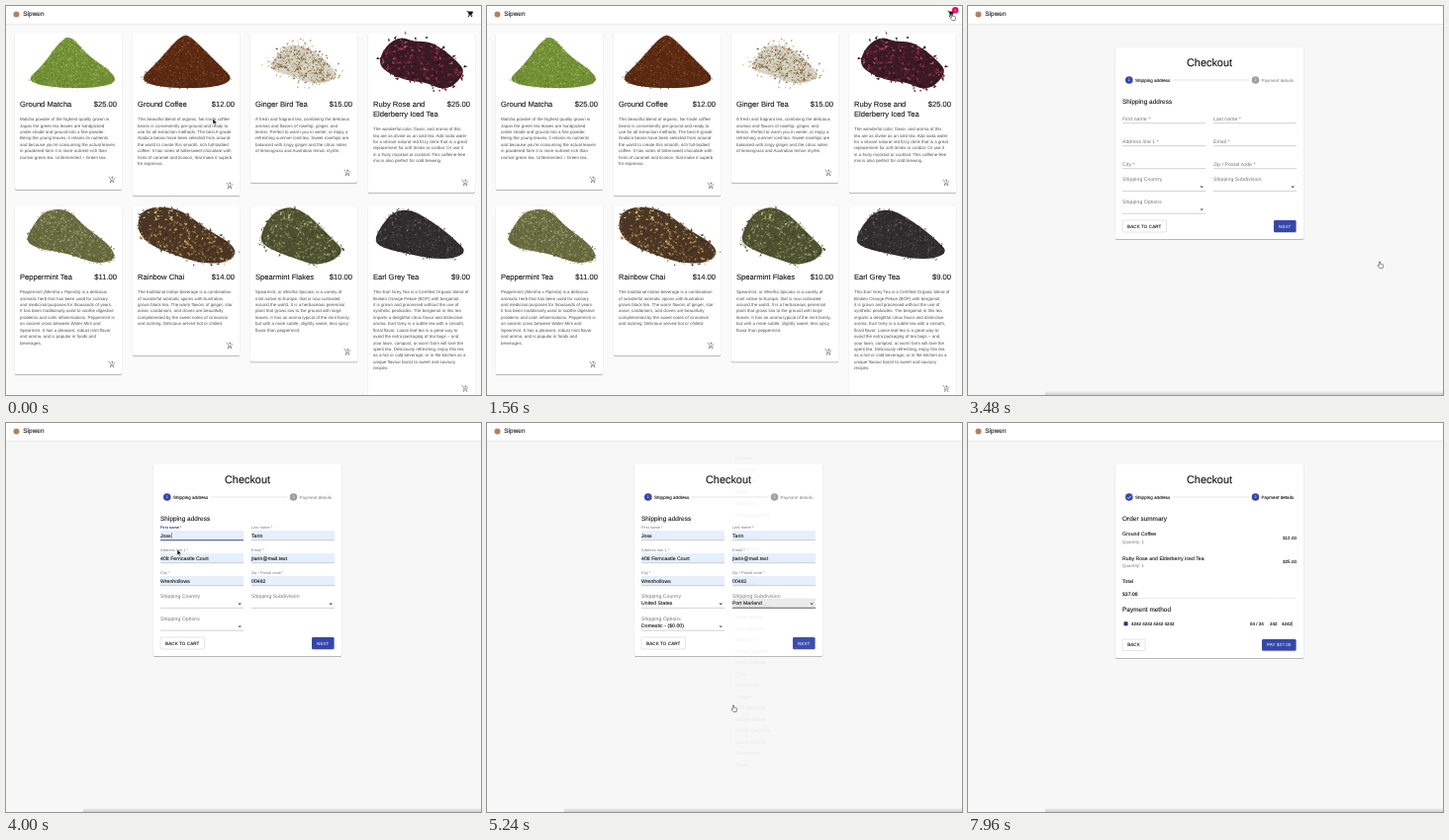
An HTML page that plays this animation: 480x394 px, repeating every 8000 ms.

```html
<!DOCTYPE html>
<html lang="en">
<head>
<meta charset="utf-8">
<title>Tea shop checkout</title>
<style>
html, body { margin: 0; width: 100%; height: 100%; overflow: hidden; background: #fafafa; }
svg { display: block; width: 100vw; height: 100vh; }
text { font-family: "Liberation Sans", Arial, sans-serif; fill: #161616; stroke: #161616; stroke-width: .1; text-rendering: geometricPrecision; white-space: pre; }
.h { letter-spacing: .0075em; }
.body { letter-spacing: .0107em; }
.cap { letter-spacing: .02em; }
.btn { letter-spacing: .0286em; }
.grey { fill: #757575; stroke: none; }
.desc { fill: #505050; stroke: none; }
.white { fill: #fff; stroke: none; }
.bold { font-weight: 700; stroke: none; }
.mid { text-anchor: middle; }
.end { text-anchor: end; }
.paper { fill: #fff; }
.menu { fill: #fff; filter: drop-shadow(0 1.5px 2px rgba(0,0,0,.3)); }
</style>
</head>
<body>
<svg id="stage" viewBox="0 0 480 394" preserveAspectRatio="none"></svg>
<script>
const LOOP = 8000;
const BLUE = '#3546ab', PINK = '#f50057', LINE = '#8d8d8d';
// Scene boundaries and interactions, in ms
const AT = { cart: 1640, plus: 2200, minus: 2760, remove: 3000, checkout: 3440, fill: 3840, country: 4680, region: 5120, pay: 5840, type: 6240 };

const text = (x, y, size, str, cls = 'body', more = '') =>
  `<text x="${x}" y="${y}" font-size="${size}" class="${cls}" ${more}>${str}</text>`;
const rect = (x, y, w, h, fill, more = '') =>
  `<rect x="${x}" y="${y}" width="${w}" height="${h}" fill="${fill}" ${more}/>`;
const paper = (x, y, w, h) => rect(x - .5, y, w + 1, h + .7, '#000', 'rx="1.5" opacity=".06"') +
  rect(x, y + 2, w, h - 1.2, '#000', 'rx="1.3" opacity=".3"') + rect(x, y, w, h, '#fff', 'rx="1.3"');
const line = (x1, x2, y, color = LINE, w = .4, more = '') =>
  `<path d="M${x1} ${y}H${x2}" stroke="${color}" stroke-width="${w}" ${more}/>`;
const during = (from, to, content) => `<g data-on="${from} ${to}">${content}</g>`;
const fading = (from, to, content) => `<g data-fade="${from} ${to}">${content}</g>`;
const lines = (x, y, size, step, str, cls) =>
  str.split('|').map((s, i) => text(x, y + i * step, size, s, cls)).join('');
const button = (x, y, w, h, label, fill) => fill
  ? rect(x, y + 1, w, h - .3, '#000', 'rx="1.3" opacity=".25"') + rect(x, y, w, h, fill, 'rx="1.3"') + text(x + w / 2, y + h / 2 + 1.6, 4.48, label, 'btn mid white')
  : rect(x, y, w, h, '#fff', 'rx="1.3" stroke="#bbb" stroke-width=".4"') + text(x + w / 2, y + h / 2 + 1.6, 4.48, label, 'btn mid');

function random(seed) {
  return () => {
    seed = (seed + 0x6D2B79F5) | 0;
    let t = Math.imul(seed ^ seed >>> 15, 1 | seed);
    t = t + Math.imul(t ^ t >>> 7, 61 | t) ^ t;
    return ((t ^ t >>> 14) >>> 0) / 4294967296;
  };
}

function inside(points, x, y) {
  let hit = false;
  points.forEach(([x1, y1], i) => {
    const [x2, y2] = points.at(i - 1);
    if (y1 > y !== y2 > y && x < (x2 - x1) * (y - y1) / (y2 - y1) + x1) hit = !hit;
  });
  return hit;
}

// A heap of grains within an outline; colours run from light to dark.
function heap(id, { outline, grain, count, loose, colors }) {
  const rnd = random(id * 97 + 5), f = n => n.toFixed(1);
  const points = outline.split(' ').map(p => p.split(',').map(Number));
  const xs = points.map(p => p[0]), ys = points.map(p => p[1]);
  const left = Math.min(...xs), top = Math.min(...ys);
  const width = Math.max(...xs) - left, height = Math.max(...ys) - top;
  const middle = ([ax, ay], [bx, by]) => `${(ax + bx) / 2} ${(ay + by) / 2}`;
  const body = 'M' + middle(points.at(-1), points[0]) +
    points.map((p, i) => `Q${p.join(' ')} ${middle(p, points[(i + 1) % points.length])}`).join('') + 'Z';
  const paths = colors.map(() => '');
  for (let i = 0; i < count;) {
    let x = left + width * rnd(), y = top + height * rnd();
    if (!inside(points, x, y)) continue;
    i++;
    const depth = (y - top) / height;
    x += (rnd() + rnd() - 1) * loose;
    y += (rnd() + rnd() - 1) * loose;
    const tone = Math.floor((rnd() * .8 + depth * .2) * colors.length);
    const a = rnd() * 6.28, r = grain * (.5 + rnd() * .7), dx = Math.cos(a) * r, dy = Math.sin(a) * r;
    paths[tone] += `M${f(x - dx)} ${f(y - dy)}l${f(dx * 2)} ${f(dy * 2)}l${f(-dy - dx * .6)} ${f(dx - dy * .6)}z`;
  }
  return `<g id="heap${id}"><path d="${body}" fill="${colors.at(-2)}" opacity="${loose > 6 ? .25 : 1}"/>` +
    paths.map((d, i) => `<path d="${d}" fill="${colors[i]}"/>`).reverse().join('') + '</g>';
}
const pile = (grain, count, loose, colors, outline) => ({ grain, count, loose, colors: colors.split(' '), outline });

const products = [
  { name: 'Ground Matcha', price: 25, h: 158, pile: pile(.9, 1100, 1.5, '#b4cb78 #9dba59 #86a443 #6f8d33 #567423',
      '13,46 24,36 34,24 44,10 53,3 60,6 70,18 82,28 94,36 103,46 96,52 75,55 48,55 24,52'),
    desc: 'Matcha powder of the highest quality grown in|Japan the green tea leaves are handpicked|under shade and ground into a fine powder.|Being the young leaves, it retains its nutrients|and because you’re consuming the actual leaves|in powdered form it is more nutrient-rich than|normal green tea. Unfermented = Green tea.' },
  { name: 'Ground Coffee', price: 12, h: 164, pile: pile(.9, 1100, 1.5, '#a9683c #8a4c27 #70381a #582811 #3f1b0b',
      '8,45 22,32 36,16 46,5 54,1 62,6 76,20 90,34 101,45 92,52 72,55 40,55 18,52'),
    desc: 'This beautiful blend of organic, fair-trade coffee|beans is conveniently pre-ground and ready to|use for all extraction methods. The best A-grade|Arabica beans have been selected from around|the world to create this smooth, rich full-bodied|coffee. It has notes of bittersweet chocolate with|hints of caramel and licorice, that make it superb|for espresso.' },
  { name: 'Ginger Bird Tea', price: 15, h: 151, pile: pile(1.4, 520, 9, '#efe6c8 #d6c99a #b3a76c #8f8a4e #9c4a32 #5d5230 #7d7344',
      '20,31 28,20 38,11 50,12 66,18 80,32 90,44 72,51 55,49 40,42 24,38'),
    desc: 'A fresh and fragrant tea, combining the delicious|aromas and flavors of rosehip, ginger, and|lemon. Perfect to warm you in winter, or enjoy a|refreshing summer iced tea. Sweet rosehips are|balanced with zingy ginger and the citrus notes|of lemongrass and Australian lemon myrtle.' },
  { name: 'Ruby Rose and|Elderberry Iced Tea', price: 25, h: 161, pile: pile(2.2, 330, 6, '#a8506a #8f2c46 #5e1f34 #43192a #2e1420 #3a1a24 #241018',
      '10,29 18,12 32,3 46,8 62,8 76,16 90,28 98,38 88,52 74,57 58,49 40,48 18,39'),
    desc: 'The wonderful color, flavor, and aroma of this|tea are as divine as an iced tea. Add soda water|for a vibrant natural red fizzy drink that is a great|replacement for soft drinks or cordial. Or use it|in a fruity mocktail or cocktail. This caffeine-free|mix is also perfect for cold brewing.' },
  { name: 'Peppermint Tea', price: 11, h: 170, pile: pile(1.2, 800, 3, '#b5b48e #97976c #7d7e50 #66693d #4b4e2c',
      '10,35 18,20 28,6 44,2 57,6 70,20 84,30 98,42 102,54 84,58 68,53 50,47 24,43'),
    desc: 'Peppermint <tspan font-style="italic">(Mentha x Piperita)</tspan> is a delicious|aromatic herb that has been used for culinary|and medicinal purposes for thousands of years.|It has been traditionally used to soothe digestive|problems and calm inflammations. Peppermint is|an ancient cross between Water Mint and|Spearmint. It has a pleasant, robust mint flavor|and aroma, and is popular in foods and|beverages.' },
  { name: 'Rainbow Chai', price: 14, h: 151, pile: pile(1.7, 520, 4, '#e2cc94 #c2964e #85643a #5a4630 #4a4a2c #4a3524 #33261c',
      '4,22 8,6 22,0 44,2 58,10 76,24 98,36 106,48 92,58 66,57 36,47 14,37'),
    desc: 'The traditional Indian beverage is a combination|of wonderful aromatic spices with Australian|grown black tea. The warm flavors of ginger, star|anise, cardamom, and cloves are beautifully|complimented by the sweet notes of cinnamon|and nutmeg. Delicious served hot or chilled.' },
  { name: 'Spearmint Flakes', price: 10, h: 157.4, pile: pile(1.7, 520, 4, '#b9b583 #92915c #74774a #5d6238 #4c5030 #3a3f24',
      '8,36 16,16 26,4 42,0 58,8 70,20 84,34 94,44 86,54 66,60 46,53 26,46'),
    desc: 'Spearmint, or <tspan font-style="italic">Mentha Spicata,</tspan> is a variety of|mint native to Europe, that is now cultivated|around the world. It is a herbaceous perennial|plant that grows low to the ground with large|leaves. It has an aroma typical of the mint family,|but with a more subtle, slightly sweet, less spicy|flavor than peppermint.' },
  { name: 'Earl Grey Tea', price: 9, h: 194.5, pile: pile(1.2, 700, 3, '#736b6c #524b4c #3d3739 #302b2d #211d1f',
      '5,36 14,18 26,5 42,3 56,10 74,22 88,34 100,46 86,53 64,53 40,48 18,43'),
    desc: 'This Earl Grey Tea is a Certified Organic blend of|Broken Orange Pekoe (BOP) with bergamot,|it is grown and processed without the use of|synthetic pesticides. The bergamot in this tea|imparts a delightful citrus flavor and distinctive|aroma. Earl Grey is a subtle tea with a smooth,|floral flavor. Loose leaf tea is a great way to|avoid the extra packaging of tea bags – and|your lawn, compost, or worm farm will love the|spent tea. Deliciously refreshing, enjoy this tea|as a hot or cold beverage; or in the kitchen as a|unique flavour boost to sweet and savoury|recipes.' }
];
const money = n => `$${n.toFixed(2)}`;

const trolley = (x, y, color, filled) => `<g transform="translate(${x} ${y}) scale(.32)" stroke="${color}" fill="none" stroke-width="2">
  <path d="M-11-9h3l5 10h8l4-7M-3 1l-2 4h12"/><g fill="${color}" stroke="none"><circle cx="-5" cy="8" r="2"/><circle cx="5" cy="8" r="2"/>
  ${filled ? '<path d="M-7-8H9L5 2h-8z"/>' : '<path d="M0-11h2v3h3v2H2v3H0v-3h-3v-2h3z"/>'}</g></g>`;

function productCard(p, i) {
  const x = 9 + 119 * (i % 4), y = i < 4 ? 28 : 203, extra = p.name.includes('|') ? 10 : 0;
  return paper(x, y, 108, p.h) + `<use href="#heap${i}" x="${x}" y="${y}"/>` +
    lines(x + 5, y + 74, 7.6, 10, p.name, '') + text(x + 103, y + 74, 7.6, money(p.price), 'end') +
    lines(x + 5, y + 88.2 + extra, 4.45, 6.42, p.desc, 'desc') + trolley(x + 98, y + p.h - 10, '#757575');
}

function cartCard(slot, id, name, numbers) {
  const x = 48 + 133 * slot, rows = name.split('|').length - 1, y = 178 + rows * 13.3;
  return paper(x, 64, 126, 122 + rows * 13.3) + `<use href="#heap${id}" transform="translate(${x} 72) scale(1.16)"/>` +
    lines(x + 5, 161.4, 10.9, 13.4, name, '') + text(x + 12.5, y + 1.5, 4.48, '-', 'mid') +
    text(x + 39, y + 1.5, 4.48, '+', 'mid') + numbers(x, y) + button(x + 52, y - 6, 30, 12, 'REMOVE', PINK);
}
const amounts = (qty, price) => (x, y) =>
  text(x + 26, y + 1.6, 4.6, qty, 'mid') + text(x + 120.5, 158.6, 7.5, money(price), 'end');
const gingerAmounts = (x, y) =>
  during(AT.cart, AT.plus, amounts(1, 15)(x, y)) +
  during(AT.plus, AT.minus, amounts(2, 30)(x, y)) +
  during(AT.minus, AT.remove, amounts(1, 15)(x, y));

function cartPage() {
  const ruby = slot => cartCard(slot, 3, 'Ruby Rose and|Elderberry Iced|Tea', amounts(1, 25));
  const subtotal = n => text(48, 262.3, 10.9, `Subtotal: ${money(n)}`, '');
  return rect(0, 0, 480, 394, '#fdfdfd') + text(48, 54.2, 12, 'Your Shopping Cart', '') +
    cartCard(0, 1, 'Ground Coffee', amounts(1, 12)) +
    during(AT.cart, AT.remove, cartCard(1, 2, 'Ginger Bird Tea', gingerAmounts) + ruby(2)) +
    during(2080, AT.minus, rect(213, 172, 14, 12, '#000', 'opacity=".035" rx="1"')) +
    during(AT.remove, AT.checkout, ruby(1)) +
    during(AT.cart, AT.plus, subtotal(52)) + during(AT.plus, AT.minus, subtotal(67)) +
    during(AT.minus, AT.remove, subtotal(52)) + during(AT.remove, AT.checkout, subtotal(37)) +
    button(338, 252, 48, 13.5, 'EMPTY CART', PINK) + button(392, 252, 48, 13.5, 'CHECKOUT', BLUE);
}

const stepDot = (x, label, color) => `<circle cx="${x}" cy="75" r="3.8" fill="${color}"/>` + text(x, 76.4, 3.8, label, 'mid white');
const tick = `<circle cx="162.8" cy="75" r="3.8" fill="${BLUE}"/><path d="M160.9 75.1l1.4 1.4 2.6-2.8" fill="none" stroke="#fff" stroke-width=".8"/>`;

function field(x, y, label, value, focused) {
  const blue = focused ? during(AT.fill, 4300, line(x, x + 84, y + 4.7, BLUE, .9) + text(x, y - 6.8, 3.85, label, 'cap', `style="fill:${BLUE};stroke:none"`) + rect(x + 11.2, y - 3, .4, 6, '#222')) : '';
  return during(AT.checkout, AT.fill, text(x, y + 1.8, 5.12, label, 'body grey')) +
    during(AT.fill, AT.pay, rect(x, y - 5, 84, 9.7, '#e6effc') + text(x, y - 6.8, 3.85, label, 'cap grey') + text(x, y + 1.8, 5.12, value)) +
    line(x, x + 84, y + 4.7) + blue;
}
function select(x, y, label, value, from) {
  return text(x, y - 5.8, 5.12, label, 'body grey') + during(from, AT.pay, text(x, y + 1.7, 5.12, value)) +
    `<path d="M${x + 78.4} ${y}h3.6l-1.8 1.8z" fill="#555"/>` + line(x, x + 84, y + 4.8);
}
function menu(x, y, w, names, from, to) {
  return fading(from, to, rect(x, y, w, names.length * 11.5 + 5, '#fff', 'rx="1.3" class="menu"') +
    names.map((n, i) => text(x + 5, y + 10 + i * 11.5, 5.12, n)).join(''));
}
const countries = 'Sudan,Suriname,Sweden,Switzerland,Tanzania,Thailand,Togo,Tonga,Tunisia,Turkey,Uganda,Ukraine,United Kingdom,United States,Uruguay,Vanuatu,Vietnam,Yemen,Zambia,Zimbabwe'.split(',');
const regions = 'Kansas,Kentucky,Louisiana,Maine,Maryland,Massachusetts,Michigan,Minnesota,Mississippi,Missouri,Montana,Nebraska,Nevada,New Hampshire,New Jersey,New Mexico,New York,North Carolina,North Dakota,Ohio,Oklahoma,Oregon,Port Marland,Rhode Island,South Carolina,South Dakota,Tennessee,Texas'.split(',');

const shipping = () => paper(149, 42, 190, 194) + stepDot(162.8, 1, BLUE) + stepDot(290.5, 2, '#9e9e9e') +
  text(296.5, 76.6, 4.48, 'Payment details', 'body grey') + text(156, 98.7, 6.4, 'Shipping address', 'h') +
  field(156, 114, 'First name *', 'Joss', true) + field(248, 114, 'Last name *', 'Tarin') +
  field(156, 137, 'Address line 1 *', '408 Ferncastle Court') + field(248, 137, 'Email *', 'jtarin@mail.test') +
  field(156, 160, 'City *', 'Wrenhollows') + field(248, 160, 'Zip / Postal code *', '00482') +
  during(AT.region, AT.pay, rect(248, 177.6, 84, 9.6, '#e9e9e9')) +
  select(156, 182.6, 'Shipping Country', 'United States', AT.country) +
  select(248, 182.6, 'Shipping Subdivision', 'Port Marland', AT.region) +
  during(AT.region, AT.pay, line(248, 332, 187.3, '#333', .7)) +
  select(156, 205.4, 'Shipping Options', 'Domestic - ($0.00)', AT.country + 160) +
  button(156, 217, 44.5, 12, 'BACK TO CART') + button(309, 217, 22.5, 12, 'NEXT', BLUE);

const orderLine = (y, name, price) => text(156, y, 5.12, name) + text(156, y + 7.2, 4.48, 'Quantity: 1', 'body grey') +
  text(332, y + 3.3, 4.48, money(price), 'body end');
const payment = () => paper(149, 42, 190, 196) + tick + stepDot(290.5, 2, BLUE) +
  text(296.5, 76.6, 4.48, 'Payment details') + text(156, 98.7, 6.4, 'Order summary', 'h') +
  orderLine(114.4, 'Ground Coffee', 12) + orderLine(138.6, 'Ruby Rose and Elderberry Iced Tea', 25) +
  text(156, 161.9, 5.12, 'Total') + text(156, 174.9, 5.12, '$37.00', 'bold') +
  line(156, 332, 177.6, '#aaa', .4, 'stroke-dasharray="1 .6"') + text(156, 191.3, 6.4, 'Payment method', 'h') +
  during(AT.pay, AT.type, rect(156.5, 201.2, 5.6, 4, '#bbb', 'rx=".5"')) +
  during(AT.type, LOOP, rect(157.5, 201.3, 4, 4, '#2b3170')) +
  [165, 285, 305, 317].map((x, i) => text(x, 205, 4.48, '', '', `id="pay${i}"`)).join('') +
  `<rect id="caret" y="200.6" width=".45" height="5.4" fill="#222"/>` +
  button(156, 219, 23, 11.5, 'BACK') + button(297, 219, 34.5, 11.5, 'PAY $37.00', BLUE);

const checkoutPage = () => rect(0, 0, 480, 394, '#f7f7f7') +
  during(AT.checkout, AT.pay, shipping()) + during(AT.pay, LOOP, payment()) +
  text(244, 60.7, 10.9, 'Checkout', 'mid') + text(169, 76.6, 4.48, 'Shipping address') + line(207, 284.5, 75, '#bdbdbd') +
  menu(154, 24, 88, countries, 4320, 4760) + menu(246, 27, 107, regions, 4860, 5248);

const badge = n => `<circle cx="473.2" cy="4.2" r="3.2" fill="${PINK}"/>` + text(473.2, 5.6, 3.8, n, 'mid white');
const header = rect(0, 17.5, 480, 1, '#000', 'opacity=".1"') + rect(0, 0, 480, 17.8, '#fff') +
  '<circle cx="10.5" cy="8.6" r="3" fill="#b5805f"/>' + text(17.3, 10.2, 6.4, 'Sipwen', 'h') +
  during(0, AT.cart, trolley(469, 8, '#111', true)) +
  during(280, 640, badge(1)) + during(640, 1060, badge(2)) + during(1060, AT.cart, badge(3));

const cursor = `<g id="cursor" stroke="#fff" stroke-width=".5" stroke-linejoin="round">
  <path id="arrow" d="M0 0v6l1.4-1.3 1 2.2 1-.4-1-2.1h2z" fill="#111"/>
  <path id="hand" d="M-.6 0q.7-.8 1.2 0v2.2l2.6.6q.7.3.5 1.2l-.6 2.6h-3.2l-2-2.6q.2-.9 1.5 0z" fill="#fff" stroke="#222"/></g>`;

const stage = document.getElementById('stage');
stage.innerHTML = `<defs>
  <linearGradient id="dock" x2="0" y2="1"><stop stop-color="#999" stop-opacity="0"/><stop offset="1" stop-color="#999" stop-opacity=".45"/></linearGradient>
  ${products.map((p, i) => heap(i, p.pile)).join('')}</defs>` +
  during(0, AT.cart, rect(0, 0, 480, 394, '#fafafa') + products.map(productCard).join('')) +
  during(AT.cart, AT.checkout, cartPage()) + during(AT.checkout, LOOP, checkoutPage()) +
  header + during(AT.cart, LOOP, rect(78, 390, 402, 4, 'url(#dock)')) + cursor;

const $ = id => document.getElementById(id);
const ranges = name => [...stage.querySelectorAll(`[data-${name}]`)].map(node => [node, ...node.dataset[name].split(' ').map(Number)]);
const timed = ranges('on'), faded = ranges('fade');

// Pointer stops: time, x, y
const stops = [
  [0, 209, 114], [220, 226, 182], [320, 226, 182], [580, 345, 170], [680, 345, 170], [1000, 464, 180], [1100, 464, 180],
  [1480, 470, 8], [1700, 470, 8], [2120, 220, 178], [2320, 220, 178], [2640, 197, 181], [2800, 196, 180], [2940, 248, 178],
  [3060, 248, 178], [3320, 416, 259], [3480, 416, 259], [3700, 180, 114], [3780, 178, 116], [3920, 173, 128], [4060, 173, 128],
  [4260, 200, 183], [4360, 200, 183], [4600, 190, 182], [4700, 190, 182], [4820, 285, 183], [4900, 285, 183], [5100, 249, 286],
  [5260, 249, 286], [5680, 320, 223], [5880, 320, 223], [6120, 190, 203]
];
const arrowTimes = [[0, 160], [3560, 4160], [5920, LOOP]];
const clamp = n => Math.max(0, Math.min(1, n));

function moveCursor(t) {
  const i = Math.max(1, stops.findIndex(s => s[0] > t));
  const [t0, x0, y0] = stops[i - 1], [t1, x1, y1] = stops[i];
  const p = clamp((t - t0) / (t1 - t0)), e = p * p * (3 - 2 * p);
  const arrow = arrowTimes.some(([a, b]) => t >= a && t < b);
  $('cursor').setAttribute('transform', `translate(${x0 + (x1 - x0) * e} ${y0 + (y1 - y0) * e})`);
  $('cursor').style.display = t < 6120 ? '' : 'none';
  $('arrow').style.display = arrow ? '' : 'none';
  $('hand').style.display = arrow ? 'none' : '';
}

function typeCard(t) {
  const early = Math.max(0, Math.min(12, Math.floor((t - AT.type) / 40)));
  const late = t < 6840 ? 0 : Math.min(15, Math.floor((t - 6840) / 72) + 1);
  const part = (s, skip) => s.slice(0, Math.max(0, late - skip));
  const number = late ? '4242'.repeat(4).slice(0, 12 + late) : '424242442424'.slice(0, early);
  const values = [number.replace(/(.{4})(?=.)/g, '$1 '), part('0424', 4).replace(/^(..)/, '$1 / '), part('242', 8), part('4242', 11)];
  const hints = ['Card number', 'MM / YY', 'CVC', 'ZIP'];
  values.forEach((v, i) => {
    $('pay' + i).textContent = v || hints[i];
    $('pay' + i).setAttribute('class', v ? 'bold' : 'grey');
  });
  const active = late > 11 ? 3 : late > 8 ? 2 : late > 4 ? 1 : 0, node = $('pay' + active);
  $('caret').setAttribute('x', +node.getAttribute('x') + (values[active] ? node.getComputedTextLength() : 0));
  $('caret').style.display = t > 6120 ? '' : 'none';
}

function render(t) {
  for (const [node, a, b] of timed) node.style.display = t >= a && t < b ? '' : 'none';
  for (const [node, a, b] of faded) {
    const o = clamp(Math.min((t - a) / 160, (b - t) / 160));
    node.style.display = o ? '' : 'none';
    node.style.opacity = o;
  }
  moveCursor(t);
  if (t >= AT.pay) typeCard(t);
}

const start = performance.now();
function loop() {
  render((performance.now() - start) % LOOP);
  requestAnimationFrame(loop);
}
loop();
</script>
</body>
</html>
```
